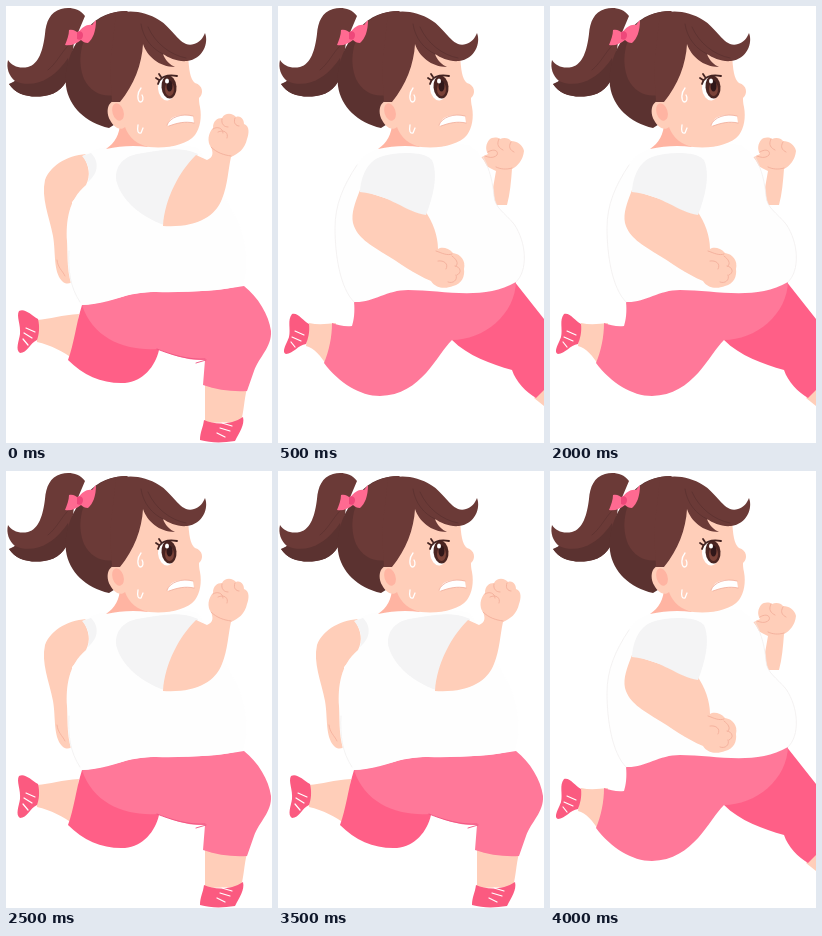
An HTML page with a canvas for the animation above (4.5 s loop, 266x437 px).

```html
<!DOCTYPE html>
<html lang="en">
<head>
<meta charset="utf-8">
<title>Running girl</title>
<style>
html, body { margin: 0; width: 100%; height: 100%; overflow: hidden; background: #fff; }
canvas { display: block; width: 100vw; height: 100vh; }
</style>
</head>
<body>
<canvas></canvas>
<script>
const W = 266, H = 437, STEP = 500;
const POSES = 'ABBABABAB';
const canvas = document.querySelector('canvas');
const ctx = canvas.getContext('2d');

const HAIR = '#6b3a37', HAIR_DARK = '#5b3230';
const SKIN = '#ffceb9', SKIN_DEEP = '#ffb4a2', SKIN_LINE = '#f2ab97';
const PINK = '#ff7899', PINK_DEEP = '#ff5f87', SHOE = '#fb5a80';
const SHIRT = '#fefefe', SHADE = '#f4f4f5';

function fill(d, color) {
  ctx.fillStyle = color;
  ctx.fill(new Path2D(d));
}

function line(d, color, width = 1) {
  ctx.strokeStyle = color;
  ctx.lineWidth = width;
  ctx.stroke(new Path2D(d));
}

function oval(x, y, rx, ry, color, turn = 0) {
  ctx.fillStyle = color;
  ctx.beginPath();
  ctx.ellipse(x, y, rx, ry, turn, 0, Math.PI * 2);
  ctx.fill();
}

function drawHead() {
  // ponytail
  fill('M79 10C73 2 63 1 55 3C44 6 40 16 39 28C37 44 33 58 22 61C13 63 6 60 2 54C0 62 3 70 9 75C7 77 5 78 3 78C10 89 24 92 38 90C52 88 60 80 64 66L68 36Z', HAIR);
  fill('M9 75C20 80 33 78 42 72C51 67 57 59 62 52L64 66C60 80 52 88 38 90C24 92 10 89 3 78Z', HAIR_DARK);
  line('M66 36C56 44 52 56 42 64', HAIR_DARK, .7);

  // neck and back of the hair
  fill('M114 116C114 128 109 137 100 143C114 140 128 139 142 141L124 116Z', SKIN_DEEP);
  fill('M82 22C92 10 106 5 121 5L150 44L122 110L103 122C80 117 63 101 60 80C58 60 66 38 82 22Z', HAIR_DARK);
  fill('M88 17C74 34 71 56 78 73C87 92 111 96 126 78L140 40L121 5C108 5 97 9 88 17Z', HAIR);

  // face and ear
  fill('M135 20C136 44 128 76 114 95C102 92 99 105 104 114C108 122 115 125 119 121C123 132 132 139 143 141C161 143 181 139 189 129C194 122 196 112 194 101C193 97 193 94 193 92C198 88 197 79 189 77C184 73 183 64 182 48L153 24Z', SKIN);
  oval(112, 106, 5.5, 9, SKIN_DEEP, -.3);

  // fringe
  fill('M110 8C124 3 140 6 153 14C167 22 175 43 188 38C194 36 197 32 199 27C203 37 197 53 181 55C172 56 163 52 157 48C159 54 164 59 169 61C153 61 141 50 137 38C136 58 128 79 114 96L106 96L104 60Z', HAIR);
  line('M135 18C137 32 146 43 157 48M142 21C149 37 164 49 180 52', HAIR_DARK, .8);

  // bow
  fill('M59 39C61 34 63 29 63 24C67 23 70 25 72 27C76 21 81 18 86 19L90 14C90 25 87 33 82 37C79 37 77 36 75 34C70 38 65 40 59 39Z', '#ff6a91');
  fill('M71 26C74 24 77 26 77 29C77 33 74 35 71 33Z', '#ee477a');

  // eye
  oval(160.5, 82, 8.5, 12.5, '#fff', -.08);
  oval(163, 81, 7.5, 11.5, '#4a2522', -.08);
  oval(163.5, 83, 4.5, 7, '#7a4238');
  oval(163.5, 80, 3, 5.5, '#301719');
  oval(161, 75, 2, 2.5, '#fff');
  line('M152 78C154 71 161 68 171 70M153 74L150 72M155 71L153 68', '#432321', 1.8);

  // mouth
  fill('M161 119C163 115 165 112 168 111C175 108 182 109 187 110L188 117C179 115 171 117 163 120Z', '#fff');
  line('M161 119C164 111 176 107 187 110M163 120C171 117 179 115 188 117', '#f0ab98', .8);

  // sweat
  line('M135 82C131 87 131 94 134 96C137 96 138 92 136 89M132 119C131 125 132 128 135 127L137 122', '#fff', 1.3);
}

function drawA() {
  // trailing leg
  fill('M31 314C44 313 56 309 73 308L68 353C57 346 45 339 31 336Z', SKIN);
  fill('M76 299C70 318 68 338 62 354C78 370 97 378 119 377C137 375 149 361 153 344L137 308Z', PINK_DEEP);
  fill('M13 305C19 302 25 309 32 313C34 321 33 329 31 334C24 337 21 347 14 347C9 344 13 335 14 328C15 319 10 310 13 305Z', SHOE);
  line('M18 327L26 332M20 322L29 326M22 339L17 333', '#fff', 1.2);

  // leading leg
  fill('M199 378L241 382C238 395 238 404 235 416L199 417Z', SKIN);
  fill('M198 414C209 419 225 419 237 411C239 419 233 427 229 435C216 437 205 437 194 434C194 426 197 422 198 414Z', SHOE);
  line('M216 417L226 420M214 422L224 425M211 427L219 431', '#fff', 1.2);
  fill('M76 299C103 297 121 286 150 286C181 287 215 284 238 280C252 291 263 309 265 325C266 341 253 351 248 365L241 385C227 386 211 384 197 379L199 354C183 355 166 349 151 343C120 345 87 333 76 299Z', PINK);
  line('M151 343C166 349 183 354 199 353M190 357L200 354', '#ef5380', .9);

  // far arm
  fill('M84 148C64 148 45 158 39 174C35 192 43 210 47 230C50 247 47 265 56 275C60 279 65 278 68 274L66 196L87 172Z', SKIN);
  line('M51 254C52 262 56 264 59 270', SKIN_LINE, .7);

  // shirt
  fill('M130 138C108 139 89 141 77 150C83 160 85 169 80 179C62 194 60 216 61 235C62 257 60 276 75 299C95 299 111 292 126 288C165 282 198 290 237 279C244 258 239 233 232 216L192 142C174 136 149 142 130 138Z', SHIRT);
  fill('M76 150L85 147C94 156 92 168 82 176C85 166 82 156 76 150Z', SHADE);
  line('M63 245C62 264 64 281 74 296', '#f0eeee', .7);

  // near arm
  fill('M111 177C107 163 116 151 131 148C151 145 173 139 192 148L180 190L158 219C136 211 117 196 111 177Z', SHADE);
  fill('M190 149L201 154C208 151 207 146 205 141C201 136 202 127 207 122C207 115 211 112 216 112C219 106 227 107 230 111C235 109 238 114 238 118C244 120 243 128 241 133C239 143 232 148 225 151C222 164 222 178 216 193C209 211 190 222 157 220C159 192 173 166 190 149Z', SKIN);
  line('M207 123C211 120 217 122 217 127M216 113C215 118 218 121 222 121M229 112C227 117 230 120 233 120M212 126C218 123 223 127 221 132M205 141C211 147 218 149 225 150', SKIN_LINE, .8);
}

function drawB() {
  // leading leg
  fill('M256 392L266 382V400Z', SKIN);
  fill('M236 275L266 313V384L258 392C248 386 238 376 234 364C213 358 190 350 174 334Z', PINK_DEEP);

  // trailing leg
  fill('M31 317C40 319 49 318 58 317L49 360C43 350 36 342 28 340Z', SKIN);
  fill('M14 308C20 306 25 315 31 318C32 326 30 333 28 338C20 339 15 348 8 348C3 346 9 337 11 331C13 323 9 314 14 308Z', SHOE);
  line('M14 331L23 335M17 325L26 329M17 341L13 336', '#fff', 1.2);
  fill('M76 296C77 305 76 314 74 320C67 321 60 319 54 317C54 331 51 345 46 357C61 377 82 390 102 390C144 389 159 348 174 334C205 334 238 309 238 274L130 276Z', PINK);

  // far arm
  fill('M202 152L210 148C207 143 208 138 211 134C214 131 219 131 222 133C226 131 231 132 233 135C239 135 245 139 246 145C245 154 240 160 234 163C233 176 232 188 229 199L212 199L218 165C211 162 205 158 202 152Z', SKIN);
  line('M210 146C216 142 221 145 219 149C215 153 210 151 207 150M221 133C218 139 221 142 225 144M233 136C230 141 232 144 236 146M218 161C222 163 228 164 234 162', SKIN_LINE, .8);

  // shirt
  fill('M129 138C106 139 88 144 79 159C65 180 57 199 57 222C57 249 62 282 76 296C95 297 108 284 130 284C165 284 205 295 238 276C250 265 249 237 236 218C226 206 217 202 216 190C215 169 208 151 191 139C170 136 147 142 129 138Z', SHIRT);
  line('M79 159C65 180 57 199 57 222C57 249 62 282 76 296M205 151C212 163 215 178 216 190C217 202 226 206 236 218C249 237 250 265 238 276', '#efeded', .7);

  // near arm
  fill('M82 184C77 197 73 207 75 217C79 232 93 239 105 247C122 257 136 268 153 275C158 283 168 283 175 280C184 278 187 270 186 263C188 255 183 248 175 247C170 241 163 241 160 243C160 230 155 216 147 205Z', SKIN);
  fill('M82 186C83 169 90 154 105 150C120 146 146 145 154 154C161 170 154 194 148 209C127 206 113 189 82 186Z', SHADE);
  line('M158 245C164 247 169 250 174 248M174 250C178 253 181 257 178 260M177 260C183 261 184 267 179 269M178 269C180 274 175 278 170 276M160 255C166 254 171 258 168 263', SKIN_LINE, .8);
}

let shown = '';

function draw(pose) {
  const scale = devicePixelRatio || 1;
  const key = [pose, innerWidth, innerHeight, scale].join();
  if (key === shown) return;
  shown = key;
  canvas.width = innerWidth * scale;
  canvas.height = innerHeight * scale;
  ctx.setTransform(canvas.width / W, 0, 0, canvas.height / H, 0, 0);
  ctx.lineCap = ctx.lineJoin = 'round';
  ctx.fillStyle = '#fff';
  ctx.fillRect(0, 0, W, H);
  if (pose === 'A') drawA();
  else drawB();
  drawHead();
}

const start = performance.now();

function tick() {
  const t = performance.now() - start;
  draw(POSES[Math.floor(t / STEP) % POSES.length]);
  requestAnimationFrame(tick);
}

tick();
</script>
</body>
</html>
```
